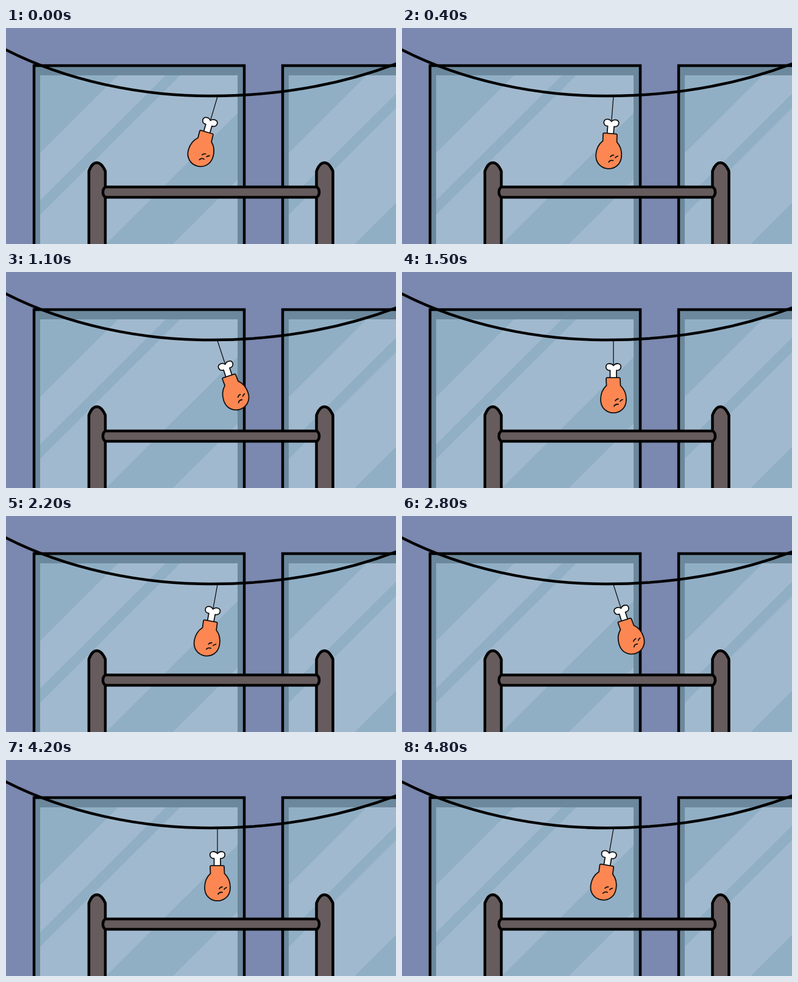
These frames come from a looping animation (640x356 px, 4.9 s). An HTML page:

```html
<!DOCTYPE html>
<html>
<head>
<meta charset="utf-8">
<style>
  html, body { margin: 0; width: 100%; height: 100%; overflow: hidden; background: #7b88af; }
  svg { display: block; width: 100vw; height: 100vh; }
</style>
</head>
<body>
<svg viewBox="0 0 640 356" preserveAspectRatio="none" stroke-linejoin="round" stroke-linecap="round">
  <defs>
    <clipPath id="pane"><path d="M56 78H380V360H56Z"/></clipPath>
    <g id="window">
      <path d="M46 62H391V370H46Z" fill="#6c889c"/>
      <g clip-path="url(#pane)">
        <path d="M56 78H380V360H56Z" fill="#a1b9ce"/>
        <path d="M40 60L-260 360H-98L202 60ZM280 60L-20 360H4L304 60ZM460 60L160 360H270L570 60Z" fill="#90afc5"/>
      </g>
      <path d="M46 62H391V370H46Z" fill="none" stroke="#000" stroke-width="4.500" stroke-linejoin="miter"/>
    </g>
    <path id="post" d="M136 366V236Q141 222 149 222Q157 222 163 236V366Z"/>
  </defs>

  <rect width="640" height="356" fill="#7b88af"/>
  <use href="#window"/>
  <use href="#window" x="408"/>

  <g fill="#665b5d" stroke="#000" stroke-width="4.500">
    <use href="#post"/>
    <use href="#post" x="373.5"/>
    <path d="M163 262H510Q514 265 514 270.500Q514 276 510 279H163Q159 276 159 270.500Q159 265 163 262Z"/>
  </g>

  <g id="drumstick" stroke="#111" stroke-width="1.8">
    <path d="M347 112V151" stroke-width="1.3"/>
    <path d="M341.500 175V161C334 162 332 151 339 150Q344 149 347 153Q350 149 355 150C362 151 360 162 352 161V175Z" fill="#fff"/>
    <path d="M335 175Q335 173 337 173H356Q358 173 358 175L358.500 186C365 192 368 200 368 209C368 223 358 231 347 231C336 231 326 223 326 209C326 200 329 192 335.500 186Z" fill="#fc8752"/>
    <path d="M350 211Q352 208 355 208M358 212Q359 210 362 209M348 220Q350 216 355 217" fill="none"/>
  </g>

  <path d="M0 36C100 87 220 112 335 112C450 112 550 93 640 59" fill="none" stroke="#000" stroke-width="4.500"/>
</svg>
<script>
  const LOOP = 4900, STEP = 100, SWING = 19.5;
  // Times at which the drumstick hangs straight down; it swings right first
  const crossings = [450, 1500, 2350, 3600, 4200, 4690, 450 + LOOP];
  const drumstick = document.getElementById('drumstick');

  function angleAt(time) {
    const t = time < crossings[0] ? time + LOOP : time;
    const i = crossings.findIndex(c => c > t) - 1;
    const u = (t - crossings[i]) / (crossings[i + 1] - crossings[i]);
    return SWING * Math.sin(Math.PI * (i + u));
  }

  function draw(now) {
    const t = Math.floor(now % LOOP / STEP) * STEP;
    drumstick.setAttribute('transform', `translate(0 1.2) rotate(${-angleAt(t)} 347 112)`);
    requestAnimationFrame(draw);
  }
  draw(0);
</script>
</body>
</html>
```
